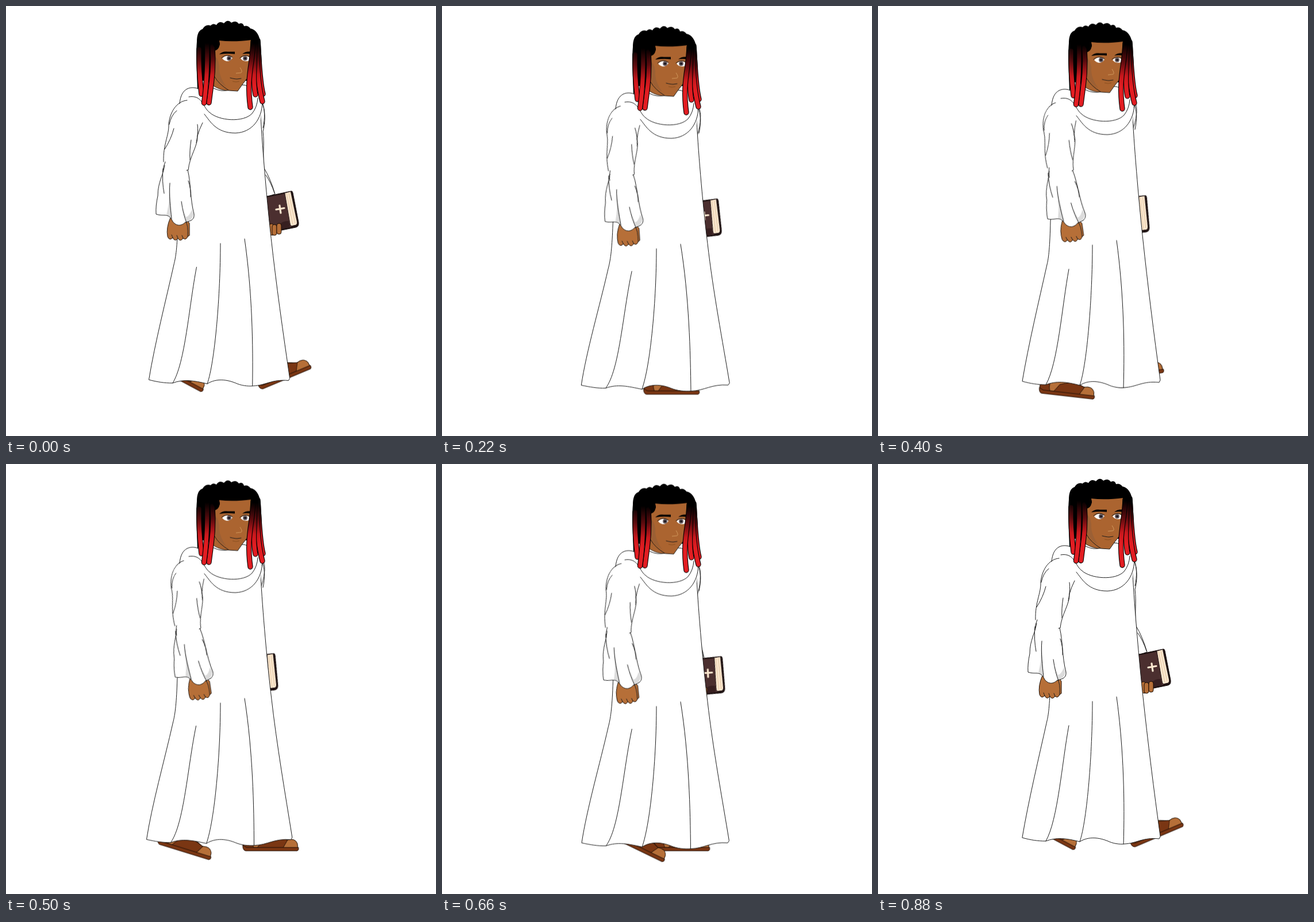
Recreate the animation shown at these times as an HTML page without scripts. Size 748x748 px, loop 900 ms.

```html
<!DOCTYPE html>
<html lang="en">
<head>
<meta charset="utf-8">
<title>Walking man in a white robe</title>
<style>
html, body { margin: 0; width: 100%; height: 100%; overflow: hidden; background: #fff; }
svg { display: block; width: 100vw; height: 100vh; }
.line { fill: none; stroke: #1c1c1c; stroke-width: 1; stroke-linecap: round; stroke-linejoin: round; }
.cloth { fill: #fff; stroke: #1c1c1c; stroke-width: 1; stroke-linejoin: round; }
.white { fill: #fff; }
.shade { fill: #dcdcdc; }
.skin { fill: #b66f38; stroke: #1a0d05; stroke-width: 1; stroke-linejoin: round; }
.face { fill: #ab6430; }
.leather { fill: #7a3613; stroke: #1a0d05; stroke-width: .9; stroke-linejoin: round; }
.edge { fill: none; stroke: #000; stroke-width: 9.4; stroke-linecap: round; }
.lock { fill: none; stroke: url(#dye); stroke-width: 7.2; stroke-linecap: round; }

.bob, .near, .fore, .far, .book, .foot, .robe, .folds { animation: 900ms linear infinite; }
.bob { animation-name: bob; }
.near { animation-name: near; transform-origin: 318px 190px; }
.fore { animation-name: fore; transform-origin: 306px 280px; }
.far { animation-name: far; transform-origin: 447px 185px; }
.book { animation-name: book; transform-origin: 480px 355px; }
.foot.front { animation-name: frontStep; }
.foot.back { animation-name: backStep; }
.robe { animation-name: robe; animation-delay: -20ms; }
.folds { animation-name: folds; animation-delay: -20ms; }

@keyframes bob {
  0%, 97.78%, 100% { transform: translateY(0); }
  15.56% { transform: translateY(5.7px); }
  24.5% { transform: translateY(9.2px); }
  29% { transform: translateY(10px); }
  33.33% { transform: translateY(9px); }
  48.9% { transform: translateY(.3px); }
  55.56% { transform: translateY(2.7px); }
  73.33% { transform: translateY(8.6px); }
  82.22% { transform: translateY(10.7px); }
  88% { transform: translateY(7.5px); }
}
@keyframes near {
  0%, 97.78%, 100% { transform: rotate(0deg); }
  15.56% { transform: rotate(-8.4deg); }
  33.33% { transform: rotate(-12.7deg); }
  47% { transform: rotate(-14.3deg); }
  55.56% { transform: rotate(-13.3deg); }
  73.33% { transform: rotate(-7.2deg); }
  82.22% { transform: rotate(-4.8deg); }
}
@keyframes fore {
  0%, 97.78%, 100% { transform: rotate(0deg); }
  15.56% { transform: rotate(6deg); }
  33.33% { transform: rotate(7deg); }
  55.56% { transform: rotate(4.9deg); }
  73.33% { transform: rotate(1.2deg); }
  82.22% { transform: rotate(-.3deg); }
}
@keyframes far {
  0%, 97.78%, 100% { transform: rotate(0deg); }
  15.56% { transform: rotate(4.4deg); }
  33.33% { transform: rotate(9.5deg); }
  47% { transform: rotate(12deg); }
  55.56% { transform: rotate(11.3deg); }
  73.33% { transform: rotate(4.9deg); }
  82.22% { transform: rotate(2.9deg); }
}
@keyframes book {
  0%, 97.78%, 100% { transform: rotate(0deg); }
  15.56%, 73.33%, 82.22% { transform: rotate(1.5deg); }
  33.33%, 55.56% { transform: rotate(-5.5deg); }
}
@keyframes frontStep {
  0%, 97.78%, 100% { transform: translate(532px, 630px) rotate(-23deg); }
  8% { transform: translate(507px, 667px) rotate(-4deg); }
  15.56% { transform: translate(484px, 673px) rotate(0deg); }
  33.33% { transform: translate(412px, 678px) rotate(0deg); }
  44% { transform: translate(377px, 684px) rotate(6deg); }
  55.56% { transform: translate(355px, 689px) rotate(17deg); }
  64.5% { transform: translate(352px, 693px) rotate(34deg); }
  73.33% { transform: translate(384px, 693px) rotate(26deg); }
  82.22% { transform: translate(450px, 683px) rotate(11deg); }
}
@keyframes backStep {
  0%, 97.78%, 100% { transform: translate(341px, 672px) rotate(28deg); }
  15.56% { transform: translate(293px, 661px) rotate(48deg); }
  24% { transform: translate(340px, 657px) rotate(42deg); }
  33.33% { transform: translate(411px, 657px) rotate(24deg); }
  48.9% { transform: translate(531px, 630px) rotate(-23deg); }
  55.56% { transform: translate(509px, 673px) rotate(0deg); }
  73.33% { transform: translate(466px, 673px) rotate(0deg); }
  82.22% { transform: translate(432px, 672px) rotate(2deg); }
}
/* the hem swings wide once per step */
@keyframes robe {
  0%, 34.4%, 53.3%, 82.2%, 100% { d: path("M318 200C305 260 303 330 300 372C299 415 297 435 294 447C280 510 262 585 251 650C265 654 278 656 292 656C310 649 328 651 351 657C367 647 385 650 400 656C408 660 420 662 428 661C450 660 460 649 489 652L491 648C480 570 469 480 461 405C455 350 446 250 443 190Z"); }
  17.8%, 66.7% { d: path("M318 200C305 260 298 330 294 368C292 405 290 425 283 450C268 515 238 600 232 651C248 653 262 656 276 655C300 647 318 654 344 658C362 646 385 650 398 656C410 660 425 661 440 660C464 660 480 647 508 648L511 645C498 580 475 500 463 402C455 350 446 250 443 190Z"); }
}
@keyframes folds {
  0%, 34.4%, 53.3%, 82.2%, 100% { d: path("M332 455C320 520 313 620 292 656M373 413C373 500 364 620 351 657M415 405C428 500 429 590 427 661"); }
  17.8%, 66.7% { d: path("M328 449C308 530 304 630 276 655M373 413C373 500 362 610 344 658M415 405C432 490 436 600 440 660"); }
}
</style>
</head>
<body>
<svg viewBox="0 0 748 748">
  <defs>
    <linearGradient id="dye" gradientUnits="userSpaceOnUse" x1="0" y1="64" x2="0" y2="138">
      <stop offset="0" stop-color="#000"/>
      <stop offset=".4" stop-color="#5c0b0e"/>
      <stop offset=".75" stop-color="#c9181d"/>
      <stop offset="1" stop-color="#e21d22"/>
    </linearGradient>
    <g id="sandal">
      <path class="skin" d="M-90-6Q-92-30-72-42L-44-30L-20-19Q-6-23-2-13L-1-5Z"/>
      <path class="leather" d="M-96-5Q-99-24-84-32L-72-30Q-84-20-78-5Z"/>
      <path class="leather" d="M-72-5L-62-19L-40-26L-19-19L-27-5Z"/>
      <path class="leather" d="M-97-10Q-97-1-92 0H-2Q1-1 0-6H-90Z"/>
    </g>
    <path id="lockA" d="M336 75C335 110 338 135 340 153"/>
    <path id="lockB" d="M349 45C351 90 350 130 344.500 168.500"/>
    <path id="lockC" d="M359 70C362 110 357 135 353 168"/>
    <path id="lockD" d="M438 60C440 100 442 135 447 153"/>
    <path id="lockE" d="M436 60C437 110 439 140 446 166"/>
    <path id="lockF" d="M433 60C433 100 429 130 434 154"/>
    <path id="lockG" d="M430 62C429 100 418 125 425 176"/>
  </defs>

  <g class="foot back"><use href="#sandal"/></g>
  <g class="foot front"><use href="#sandal"/></g>

  <g class="bob">
    <!-- far arm with the book -->
    <g class="far">
      <path class="cloth" d="M445 168C452 180 451 205 447 218C450 240 446 265 449 282Q460 300 468 327L447 335L430 200Z"/>
      <path class="line" d="M452 294Q461 307 467 325"/>
      <g class="book">
        <path d="M440 334L496 322Q498 321 499 325L509 376Q510 384 504 385L455 395Z" fill="#211414" stroke="#150b0b"/>
        <path d="M484 326L495 323L506 375Q507 381 502 381L490 384Z" fill="#fbe8d0"/>
        <path d="M488 326L499 380M492 325L503 378" fill="none" stroke="#d9b992" stroke-width=".8"/>
        <path d="M440 335L485 326L494 378Q495 384 500 384L455 393Z" fill="#4b2f2f" stroke="#211414"/>
        <path d="M474 382Q481 373 492 374L494 384L476 389Z" fill="#371f20"/>
        <path d="M476 347L478 360M470 354L484 351.500" fill="none" stroke="#fbe8d0" stroke-width="3.200" stroke-linecap="round"/>
        <g class="skin">
          <path d="M456 382Q463 375 467 383L468 396Q465 401 459 397Z"/>
          <rect x="463" y="380" width="8" height="19" rx="4"/>
          <rect x="471" y="378" width="8" height="19" rx="4"/>
        </g>
      </g>
    </g>

    <!-- robe -->
    <path class="cloth robe"/>
    <path class="line folds"/>

    <!-- hood -->
    <path class="white" d="M302 170C304 142 322 137 340 146L362 142L415 137L445 165L443 200L345 205Z"/>
    <path class="line" d="M302 170C304 142 322 137 340 146M361 143Q375 150 388 146M410 137Q417 137 421 140M446 168C450 178 451 195 447 212"/>

    <!-- near arm -->
    <g class="near">
      <g class="fore">
        <path class="skin" d="M286 368Q278 386 281 401Q284 409 290 403Q294 411 299 404Q303 411 308 404Q313 408 316 401L319 399V378L310 366Z"/>
        <path class="line" d="M290 403L288 398M299 404L297 399M308 404L306 399M313 376Q317 380 316 401"/>
        <path class="white" d="M277 271C274 295 264 305 264 330Q260 348 261 362C275 367 282 358 290 375C298 385 307 381 312 376C321 374 328 372 327 362C320 335 322 310 316 285L300 262Z"/>
        <path class="shade" d="M285 308C285 330 288 350 287 370Q283 364 279 363Q285 340 285 308ZM307 350L313 375Q325 373 326 362L323 354Q319 366 313 367Z"/>
        <path class="line" d="M277 271C274 295 264 305 264 330Q260 348 261 362C275 367 282 358 290 375C298 385 307 381 312 376C321 374 328 372 327 362C320 335 322 310 316 285M273 283Q271 305 275 326M285 308C283 330 286 350 288 370M305 340Q308 362 314 377M317 304Q322 318 321 332"/>
      </g>
      <path class="white" d="M323 166C303 163 286 180 283 205C284 225 273 240 274 276L300 286L316 285C318 270 323 255 332 239C330 225 336 215 342 203L336 184Z"/>
      <path class="line" d="M315 164C300 165 286 180 283 205C284 225 273 240 274 271M297 182Q287 190 284 206M292 213Q287 232 276 249M342 203Q336 215 333 226C334 243 319 262 317 285L314 286M333 206Q335 218 331 238M322 233Q319 252 320 268M277 271Q273 280 273 288"/>
    </g>

    <!-- collar -->
    <path class="line" d="M318 158C342 154 342 176 354 185C370 200 413 203 428 187Q437 176 438 160M345 188C355 200 365 221 399 221C428 220 445 197 446 168"/>

    <!-- head -->
    <path d="M333 145C332 115 330 85 332 62Q332 43 342 40Q347 31 356 34Q360 29 366 33Q371 25 379 30Q386 22 392 29Q400 24 405 31Q412 28 414 35Q421 33 425 39Q440 42 443 66L445 100L430 130H340Z"/>
    <path class="face" d="M362 108L361 139Q374 147 387 147L400 140L380 112Z" stroke="#1a0d05" stroke-width=".8"/>
    <path class="face" d="M364 58H426L425 100Q425 115 422 123Q413 133 403 148L388 147Q370 136 363 116Z"/>
    <path d="M364 88Q372 95 371 111Q372 125 383 140Q366 130 363 115Z" fill="#9c6035"/>
    <path class="line" d="M422 123Q413 133 403 148L388 147Q370 136 363 123"/>
    <path d="M342 110L363 92V78Q374 74 371 60Q395 63 427 59L426 80L434 110L440 60L420 42H350Z"/>
    <path d="M371 84Q377 78 386 79.500L398 79.500V83.500Q385 82 371 84ZM411 83.500Q417 78 427 79.500V83.500Q418 82 411 83.500Z"/>
    <path d="M376 91Q384 83 394 90Q391 96 384 96Q379 95 376 91ZM408 91Q415 84 423 89V95Q413 98 408 91Z" fill="#fff"/>
    <g fill="#6b5f64">
      <circle cx="388" cy="91" r="4"/>
      <circle cx="416" cy="91" r="4"/>
    </g>
    <g fill="#17131a">
      <circle cx="388" cy="91" r="2"/>
      <circle cx="416" cy="91" r="2"/>
    </g>
    <path class="line" d="M375 90Q384 82 394 89M407 90Q415 83 424 88"/>
    <path d="M407 107Q412 114 409 116L400 117" fill="none" stroke="#d39a5e"/>
    <path class="line" d="M390 125Q398 127 402 127L409 126"/>
    <path d="M394 131Q400 133 406 131" fill="none" stroke="#8b5020"/>

    <use href="#lockA" class="edge"/><use href="#lockA" class="lock"/>
    <use href="#lockC" class="edge"/><use href="#lockC" class="lock"/>
    <use href="#lockB" class="edge"/><use href="#lockB" class="lock"/>
    <use href="#lockD" class="edge"/><use href="#lockD" class="lock"/>
    <use href="#lockE" class="edge"/><use href="#lockE" class="lock"/>
    <use href="#lockF" class="edge"/><use href="#lockF" class="lock"/>
    <use href="#lockG" class="edge"/><use href="#lockG" class="lock"/>
    <circle cx="366" cy="66" r="6"/>
  </g>
</svg>
</body>
</html>
```
